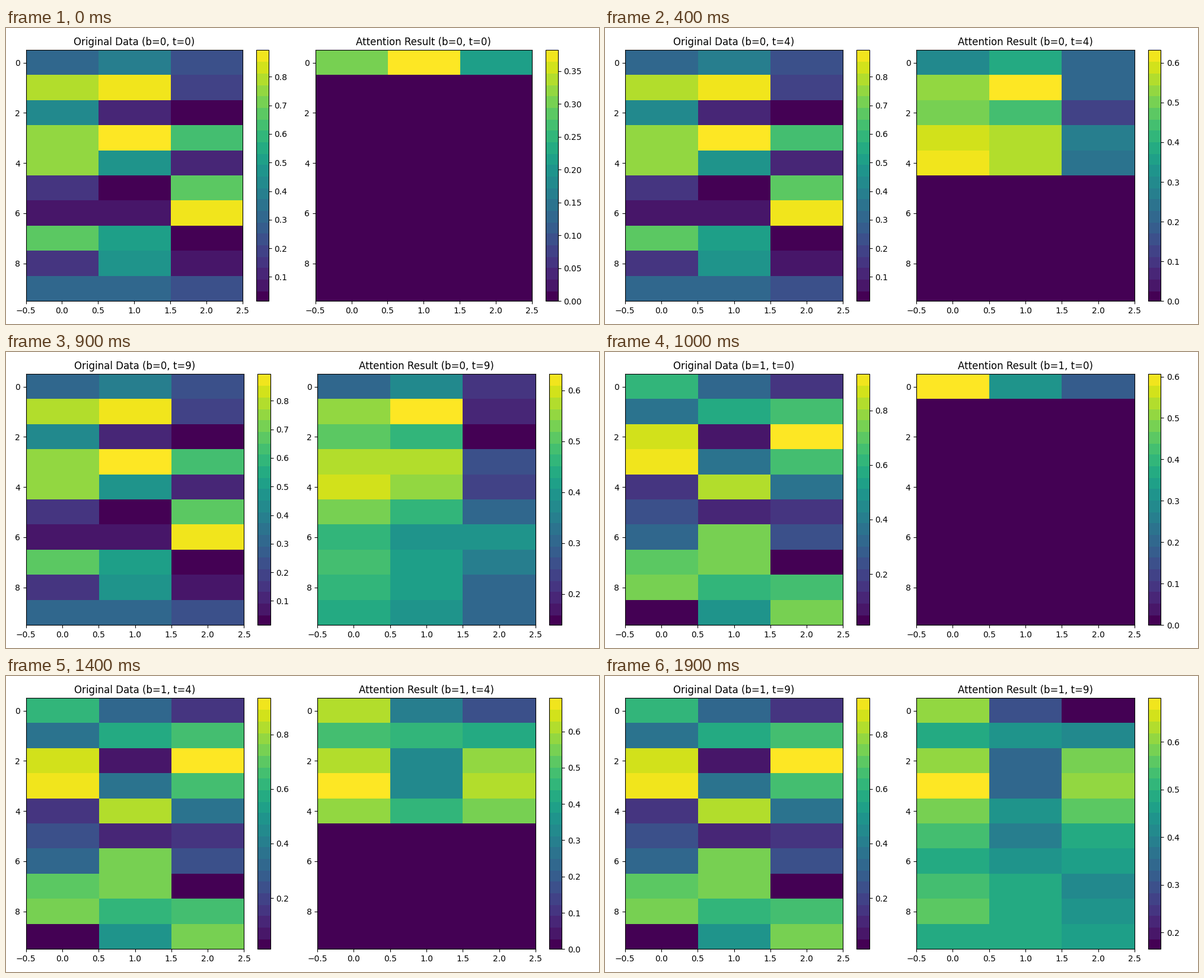
Animation, 1000 px wide and 500 px high, one loop 2 s. Source, as a matplotlib script:

```python
import matplotlib.pyplot as plt
import numpy as np
from matplotlib.animation import FuncAnimation
from matplotlib.colors import ListedColormap

ROWS = 10
INTERVAL = 100

# Two batches of ten time steps with three channels each
DATA = np.array([
    [[.305, .382, .211], [.778, .882, .186], [.450, .105, .020],
     [.765, .893, .635], [.740, .465, .125], [.150, .0155, .690],
     [.075, .065, .870], [.660, .510, .018], [.150, .452, .080],
     [.305, .291, .212]],
    [[.606, .306, .165], [.360, .594, .663], [.879, .0895, .933],
     [.923, .370, .670], [.150, .835, .370], [.255, .105, .160],
     [.305, .735, .255], [.710, .763, .015], [.730, .600, .665],
     [.013, .500, .755]],
])


def banded_viridis(first=0.038, step=0.0458):
    """Viridis in even bands, with pure colours kept at both ends."""
    v = np.linspace(0, 1, 256)
    band = np.floor((v - first) / step)
    level = np.clip(first + (band + 0.5) * step, 0, 1)
    level[v < first] = 0
    level[254:] = 1
    return ListedColormap(plt.get_cmap("viridis")(level))


CMAP = banded_viridis()


def running_mean(x, t):
    """Mean of all rows so far, for rows up to t; later rows stay zero."""
    out = np.zeros_like(x)
    counts = np.arange(1, t + 2)[:, None]
    out[:t + 1] = np.cumsum(x[:t + 1], axis=0) / counts
    return out


def heatmap(ax, values, title):
    image = ax.imshow(values, cmap=CMAP, aspect="auto")
    ax.set_title(title)
    fig.colorbar(image, ax=ax)


def draw(frame):
    b, t = divmod(frame, ROWS)
    fig.clf()
    # Start each layout from the same margins
    fig.subplots_adjust(left=0.125, right=0.9, bottom=0.11, top=0.88,
                        wspace=0.2, hspace=0.2)
    left, right = fig.subplots(1, 2)
    step = f"(b={b}, t={t})"
    heatmap(left, DATA[b], f"Original Data {step}")
    heatmap(right, running_mean(DATA[b], t), f"Attention Result {step}")
    fig.tight_layout()
    return []


fig = plt.figure(figsize=(10, 5), dpi=100)
anim = FuncAnimation(fig, draw, frames=len(DATA) * ROWS, init_func=lambda: [],
                     interval=INTERVAL, repeat=True, repeat_delay=0)
plt.show()
```
